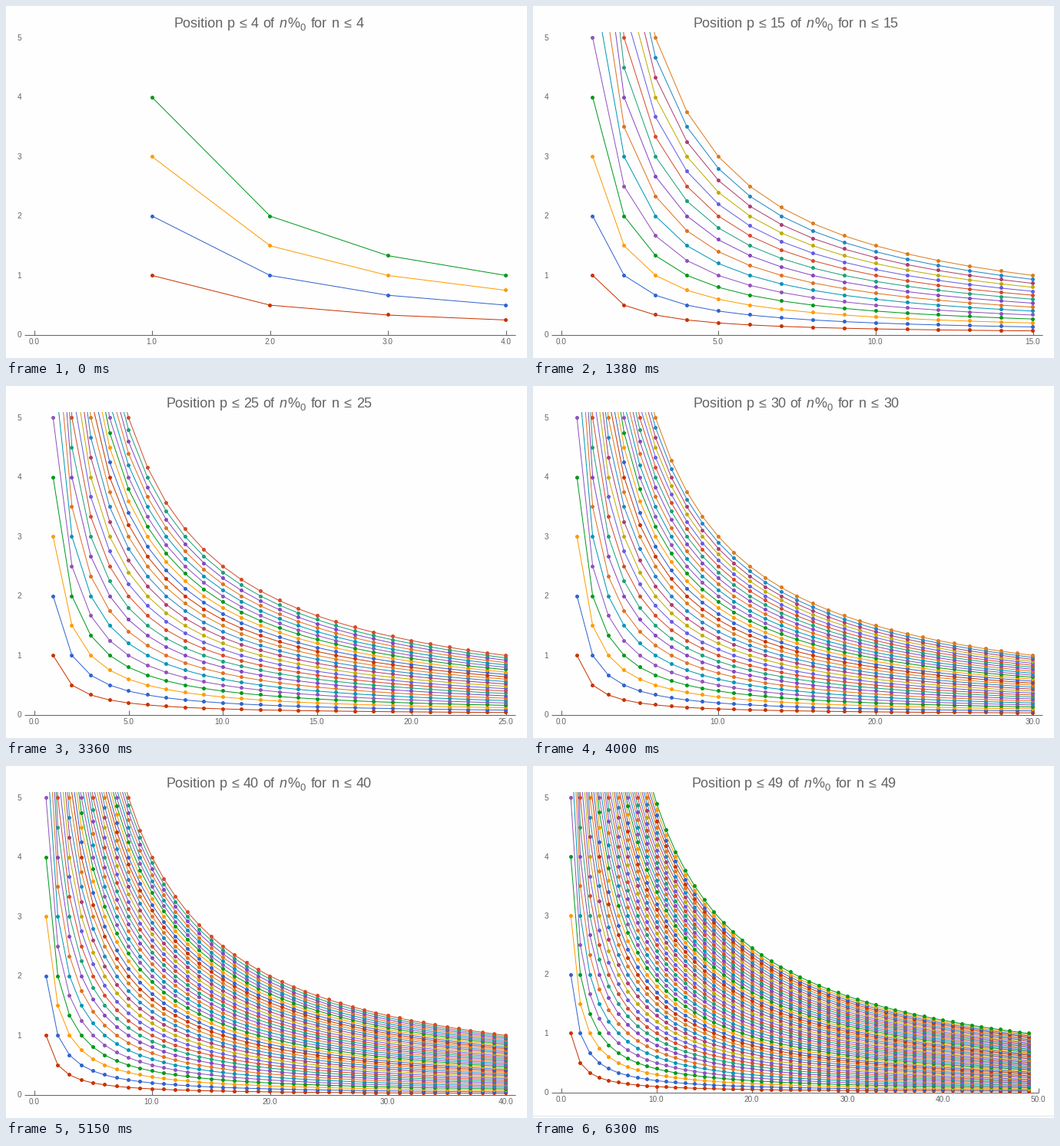
Animation of 678x459 px, one loop 6.4 s. Source, as a matplotlib script:

```python
import numpy as np
import matplotlib.pyplot as plt
from matplotlib.animation import FuncAnimation
from matplotlib.collections import LineCollection
from matplotlib.patches import Rectangle

W, H, DPI = 678, 459, 100
PX = 72 / DPI                      # one pixel in points
LOOP, STEP = 6400, 20              # ms
GREY = "#636363"
PALETTE = ["#c93300", "#3163ce", "#ff9b00", "#00981c", "#9153ba",
           "#0096b5", "#e07020", "#8447c2", "#1ca078", "#d64a2a",
           "#665ce4", "#bfab00", "#ad3d72", "#1f87c4", "#dd7a1a"]

# (start in ms, number of curves)
SCHEDULE = [(0, 4), (270, 5), (390, 6), (510, 7), (660, 9), (780, 10),
            (900, 11), (1020, 12), (1140, 13), (1260, 14), (1380, 15),
            (2450, 16), (2600, 17), (2750, 19), (2870, 20), (2990, 21),
            (3240, 23), (3360, 25), (3610, 27), (3730, 28), (4000, 30),
            (4120, 32), (4370, 34), (4620, 36), (4880, 38), (5150, 40),
            (5400, 42), (5650, 44), (6030, 47), (6300, 49)]

LEFT, TOP = 36.27, 41.3            # pixel of x = 0 and of y = 5
SPAN_X, SPAN_Y = 614, 387          # pixels for x = 0..n and y = 0..5

plt.rcParams["font.family"] = "Liberation Sans"
fig = plt.figure(figsize=(W / DPI, H / DPI), dpi=DPI, facecolor="#fefefe")
ax = fig.add_axes([0, 0, 1, 1])
ax.set_xlim(0, W)
ax.set_ylim(0, H)
ax.axis("off")


def label(x, y, text="", size=10, **kw):
    """Text with its baseline y pixels below the top edge."""
    kw.setdefault("va", "baseline")
    return ax.text(x, H - y, text, fontsize=size * PX, color=GREY, **kw)


# Title words: x, text, style, whether a second digit pushes them left
WORDS = [(219, "Position", "normal", True), (288, "p", "normal", True),
         (303, "≤", "normal", True), (319, "{n}", "normal", True),
         (334.5, "of", "normal", False), (356, "n", "italic", False),
         (366, "%", "normal", False), (397, "for", "normal", False),
         (423.5, "n", "normal", False), (439.5, "≤", "normal", False),
         (456, "{n}", "normal", False)]
title = [label(x, 28, size=18, style=style) for x, _, style, _ in WORDS]
subscript = label(382.5, 31.5, "0", size=13)

x_labels = [label(0, 441, ha="center") for _ in range(9)]
y_labels = [label(20, 0, str(v), ha="right") for v in range(6)]
axis_lines = LineCollection([], colors=GREY, linewidths=PX, zorder=1)
curves = LineCollection([], linewidths=PX, zorder=2)
for group in (axis_lines, curves):
    ax.add_collection(group)
curves.set_clip_path(Rectangle((0, 0), W, H - 33.5, transform=ax.transData))
dots = ax.scatter([], [], s=(5 * PX) ** 2, linewidths=0, zorder=3)
edge, = ax.plot([0, W], [H - 455.5] * 2, color="#e4e4e4", lw=PX)

shown = None


def tick_step(n):
    return max(s for s in (1, 2, 5, 10) if n / s >= 3)


def draw_plot(n):
    ticks = np.arange(0, n * 1.021, tick_step(n))
    overhang = ticks[-1] > n       # last label sticks out, so the plot shrinks
    scale = 0.992 if overhang else 1
    nudge = -3 if overhang else 0
    width, height = SPAN_X * scale, SPAN_Y * scale
    base = TOP + height

    def px(x):
        return LEFT + width * np.asarray(x) / n

    def py(y):
        return base - height * np.asarray(y) / 5

    for word, (x, text, _, moves) in zip(title, WORDS):
        shift = -10 if moves and n > 9 else 0
        word.set_text(text.format(n=n))
        word.set_x(x + shift + nudge)
    subscript.set_x(382.5 + nudge)

    floor_y = H - int(base) - 0.5
    lines = [[(24, floor_y), (LEFT + width * 1.021, floor_y)]]
    for i, text in enumerate(x_labels):
        text.set_visible(i < len(ticks))
        if i < len(ticks):
            x = np.floor(px(ticks[i])) + 0.5
            lines.append([(x, floor_y), (x, floor_y + 6)])
            text.set_text(str(ticks[i]))
            text.set_position((x, H - 441 - nudge))
    axis_lines.set_segments(lines)
    for v, text in enumerate(y_labels):
        text.set_y(H - np.round(py(v) + 3.7))

    k = np.arange(1, n + 1)
    p = k[:, None]
    y = p / k
    x = np.broadcast_to(px(k), y.shape)
    paths = np.stack([x + 0.5, H - py(y) - 0.5], axis=-1)
    curves.set_segments(list(paths))
    curves.set_color([PALETTE[i % 15] for i in range(n)])

    # dots sit on whole pixels
    inside = y <= 5.1
    centres = np.stack([np.round(x), H - 1 - np.round(py(y))], axis=-1) + 0.5
    dots.set_offsets(centres[inside])
    rows = np.broadcast_to(p - 1, y.shape)[inside]
    dots.set_facecolor([PALETTE[r % 15] for r in rows])
    edge.set_visible(bool(overhang))


def update(frame):
    global shown
    now = frame * STEP + STEP / 2
    n = [count for start, count in SCHEDULE if start <= now][-1]
    if n != shown:
        draw_plot(n)
        shown = n
    return []


anim = FuncAnimation(fig, update, frames=LOOP // STEP, interval=STEP,
                     init_func=lambda: update(0), repeat=True,
                     repeat_delay=0, blit=False)
plt.show()
```
